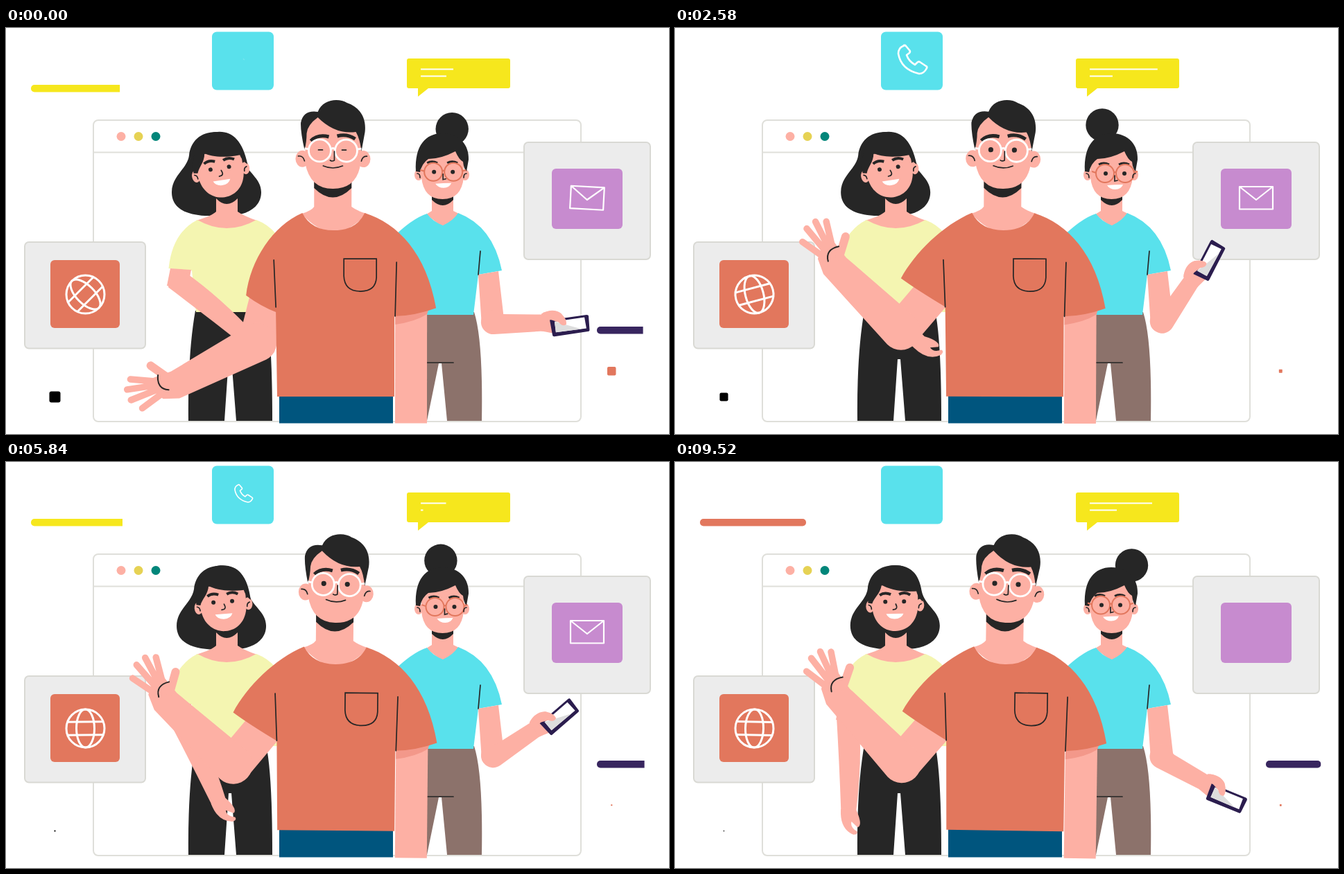
Write an HTML page that moves like this. It is 956 by 586 pixels and loops after 9600 ms.

```html
<!DOCTYPE html>
<html lang="en">
<head>
<meta charset="utf-8">
<title>Team greeting</title>
<style>
html, body { margin: 0; width: 100%; height: 100%; overflow: hidden; background: #fff; }
svg { display: block; width: 100%; height: 100%; }
.skin { fill: #fdb0a4; }
.dark { fill: #262626; }
.coral { fill: #e2775d; }
.cyan { fill: #59e1ec; }
.card { fill: #ececec; stroke: #d9d9d4; stroke-width: 2; }
.frame { fill: none; stroke: #dfdfda; stroke-width: 2; }
.ink { fill: none; stroke: #262626; stroke-width: 1.7; stroke-linecap: round; }
.brow { fill: none; stroke: #262626; stroke-width: 4; }
.white { fill: none; stroke: #fff; stroke-width: 2.6; stroke-linejoin: round; }
.finger { fill: none; stroke: #fdb0a4; stroke-width: 9.5; stroke-linecap: round; }
</style>
</head>
<body>
<svg viewBox="0 0 956 586">
  <defs>
    <clipPath id="leftTrack"><rect x="36" y="82" width="153" height="10.5" rx="5"/></clipPath>
    <clipPath id="rightTrack"><rect x="852" y="431" width="79.5" height="10.5" rx="5"/></clipPath>
  </defs>

  <!-- window, cards and small decorations -->
  <rect class="frame" x="126" y="133" width="703" height="435" rx="7"/>
  <path class="frame" d="M126 179.500H829"/>
  <circle class="skin" cx="166" cy="156.500" r="6.500"/>
  <circle cx="191" cy="156.500" r="6.500" fill="#e6d254"/>
  <circle cx="216" cy="156.500" r="6.500" fill="#02867a"/>
  <rect class="card" x="27" y="309" width="174" height="153.500" rx="6"/>
  <rect class="coral" x="64" y="335" width="100" height="98" rx="6"/>
  <g id="globe" class="white" style="stroke-width:3">
    <circle cx="114.500" cy="384.500" r="27.500"/>
    <ellipse cx="114.500" cy="384.500" rx="13" ry="27.500"/>
    <path d="M89 375H140M89 394H140"/>
  </g>
  <rect class="card" x="747" y="165" width="182" height="169" rx="6"/>
  <rect x="787" y="203" width="102" height="87" rx="6" fill="#c78bcf"/>
  <path id="envelope" class="white" style="stroke-width:2.2" d="M814 229H862V261.500H814ZL838 248L862 229"/>
  <rect class="cyan" x="297" y="5.500" width="89" height="84" rx="7"/>
  <path id="handset" class="white" d="M329 26Q322 29 322 37Q326 60 352 66Q359 66 363 58Q364 56 362 55L353 49Q351 48 349 50L346 53Q337 48 334 39L338 36Q340 34 338 32L333 26Q331 24 329 26Z"/>
  <path fill="#f6e71d" d="M581 44H724Q727 44 727 47V84Q727 87 724 87H609L594 99V87H581Q578 87 578 84V47Q578 44 581 44Z"/>
  <path id="message" class="white" style="stroke-width:2"/>
  <g id="leftBar" clip-path="url(#leftTrack)"></g>
  <g id="rightBar" clip-path="url(#rightTrack)"></g>
  <rect id="blackSquare" x="62.500" y="524.500" width="16" height="16" rx="3"/>
  <rect id="coralSquare" class="coral" x="867" y="489" width="12.500" height="12.500" rx="2"/>

  <!-- woman on the left -->
  <path id="backHair" class="dark" d="M318 149C295 149 281 163 279 183C276 203 254 212 254 236C254 258 272 268 302 270H334C362 270 383 258 383 236C383 215 362 208 357 187C353 160 340 149 318 149Z"/>
  <path class="dark" d="M273 408H375Q384 450 384 567H332L325 478H321L315 567H263Q262 470 273 408Z"/>
  <path class="skin" d="M303 235H334V265Q342 271 362 278Q318 304 274 278Q297 271 303 265Z"/>
  <path class="dark" d="M303 232H334V246Q318 262 303 246Z"/>
  <path fill="#f4f5b1" d="M276 277Q318 301 361 277Q395 290 404 330L400 410H274L268 350L234.500 347Q240 295 276 277Z"/>
  <path class="skin" d="M237 347L267 349L262 376L232 372Z"/>
  <g id="leftForearm" class="skin">
    <path d="M233 360Q247 345 265 362Q266 430 251 503L229 503Q232 430 233 360Z"/>
    <path d="M229 500Q225 528 244 538Q251 539 250 534Q240 527 243 519L251 528Q256 527 255 518Q254 510 250 500Z"/>
  </g>
  <g id="leftFace">
    <ellipse class="skin" cx="282" cy="208" rx="6" ry="9"/>
    <ellipse class="skin" cx="354" cy="207" rx="6" ry="9"/>
    <path class="skin" d="M285 178V210C287 232 302 244 318 244C335 244 349 232 351 210V178Z"/>
    <path class="dark" d="M279 203C281 165 300 149 318 149C342 149 356 165 358 202C352 197 350 191 349 187C325 188 308 183 299 177C297 190 288 195 285 204Z"/>
    <path class="brow" d="M296 192Q303 187 312 191M324 191Q332 187 340 192"/>
    <path class="ink" d="M319 205Q323 213 315 213M280 206q4 1 4 6M356 205q-4 1 -4 6"/>
    <circle class="dark" cx="304" cy="201.500" r="3"/><circle class="dark" cx="331" cy="201.500" r="3"/>
    <path fill="#fff" d="M305 219H330Q327 226.500 317 226.500Q308 226 305 219Z"/>
  </g>

  <!-- woman on the right -->
  <circle id="bun" class="dark" r="23.700"/>
  <path fill="#8c726b" d="M590 410H675Q688 450 686 567H636L628 484H624L607 567H590Z"/>
  <path class="ink" d="M607 483H645"/>
  <path class="skin" d="M614 235H645V264L655 269L630 288L606 269L614 264Z"/>
  <path class="dark" d="M614 236H645V248Q630 264 614 248Z"/>
  <path class="cyan" d="M607 268Q585 275 555 305V414H674L681 356L715 350Q702 286 652 267Q645 278 630 285Q615 279 607 268Z"/>
  <path class="skin" d="M681 356L710 351L718 420A17 17 0 0 1 686 430Z"/>
  <path class="ink" d="M684 322L681 356"/>
  <g id="rightForearm">
    <path class="skin" d="M701 407L716 413L774 413V437L704 442A17 17 0 0 1 701 407Z"/>
    <path class="skin" d="M772 412Q788 403 800 411L808 424L790 440Q778 438 772 437Z"/>
    <path d="M784 421L837 413Q840 413 840 415L841.500 434Q842 437 839 437L791 444.500Q788 445 788 442Z" fill="#2b1d4e"/>
    <path d="M791 423L834 416.500L837 432.500L793 438.500Z" fill="#fff"/>
    <path d="M793 438.500L791 423L830 433.500Z" fill="#ddd"/>
    <path class="skin" d="M774 411Q791 404 801 412Q809 420 808 427Q803 431 797 424L784 420Z"/>
  </g>
  <ellipse class="skin" cx="595" cy="212" rx="6" ry="8"/>
  <ellipse class="skin" cx="662" cy="212" rx="6" ry="8"/>
  <path class="skin" d="M599 185V215Q602 247 629.500 247Q657 247 660 215V180L640 175Z"/>
  <path class="dark" d="M591 207C589 170 605 152 629 152C655 152 668 170 667 190L664 207Q660 203 659 193Q653 190 648 178Q627 189 609 189Q600 195 597 208Z"/>
  <g id="rightFace">
    <path class="brow" style="stroke-width:3" d="M607 195Q614 191 622 195M636 195Q643 191 651 195"/>
    <path fill="none" stroke="#e2775d" stroke-width="2" d="M603 208a13 13 0 1 0 26 0a13 13 0 1 0 -26 0M632 208a13 13 0 1 0 26 0a13 13 0 1 0 -26 0M629 207Q630.500 205 632 207M603 207L597 205M658 207L663 205"/>
    <circle class="dark" cx="617" cy="208" r="3"/><circle class="dark" cx="644" cy="208" r="3"/>
    <path class="ink" d="M630 211V219L634 218"/>
    <path fill="#fff" d="M619 225Q630 224 642 224Q639 231 631 231Q623 231 619 225Z"/>
  </g>
  <path class="ink" d="M593 210q4 0 4 6M664 210q-4 0 -4 6"/>

  <!-- man in the middle -->
  <path fill="#00557e" d="M394 528H558V570.500H394Z"/>
  <g id="man">
    <path class="skin" d="M561 410H607V570.500H561Z"/>
    <path fill="#f3988a" d="M561 414L610 404L607 413Q590 424 561 428Z"/>
    <path id="upperArm" fill="none" stroke="#fdb0a4" stroke-width="54"/>
    <g id="forearm">
      <path class="skin" d="M0 28L130 20L160 24Q170 10 158 -10L137 -20L0 -28A28 28 0 0 0 0 28Z"/>
      <path class="finger" d="M157 18L187 37M160 13L198 26M160 6L200 10M154 -2L191 -8"/>
      <path class="finger" style="stroke-width:12" d="M138 14L152 41"/>
      <path class="ink" style="stroke-width:2" d="M149 24Q160 7 145 -2"/>
    </g>
    <path class="skin" d="M444 210H498V258Q506 264 520 268Q472 320 426 268Q440 264 444 258Z"/>
    <path class="dark" d="M444 215H498V231Q471 258 444 231Z"/>
    <path id="shirt" class="coral"/>
    <path class="ink" d="M386 335L389 403M563 338L561 416M487 333H534V360Q533 380 511 380Q488 380 487 358Z"/>
    <g id="manHead">
      <ellipse class="skin" cx="427" cy="189" rx="10" ry="12"/>
      <ellipse class="skin" cx="515" cy="189" rx="10" ry="12"/>
      <path class="skin" d="M431 140V195Q438 232 471 232Q506 232 511 195L515 140L450 122Z"/>
      <path class="dark" d="M430 176Q424 150 424.500 137Q428 118 449 121C456 102 480 101 491 108C512 115 519 132 517 150L512 178Q510 160 504 150Q474 154 449 129Q434 140 433 152Q433 165 430 176Z"/>
      <path class="brow" style="stroke-width:5" d="M439 163Q449 153 465 157M477 156Q491 152 503 160"/>
      <g id="openEyes" class="dark"><circle cx="453" cy="176" r="3.600"/><circle cx="487" cy="176" r="3.600"/></g>
      <path id="closedEyes" class="ink" d="M450 176H456M484 176H490"/>
      <path class="white" style="stroke-width:2.800" d="M436 177a16 16 0 1 0 32 0a16 16 0 1 0 -32 0M474 177a16 16 0 1 0 32 0a16 16 0 1 0 -32 0M468 175Q471 172 474 175M436 175L430 174M506 175L512 174"/>
      <path class="ink" d="M473 178V191Q470 193 467 191M457 199Q471 205 485 199M421 185Q428 184 430 192M520 185Q514 184 512 192"/>
    </g>
  </g>
</svg>

<script>
const LOOP = 9.6;
const parts = {};
document.querySelectorAll("[id]").forEach(el => parts[el.id] = el);

const mix = (a, b, k) => a + (b - a) * k;
const clamp01 = x => Math.min(1, Math.max(0, x));
const set = (id, name, value) => parts[id].setAttribute(name, value);
const turn = (id, angle, x, y) => set(id, "transform", `rotate(${angle} ${x} ${y})`);
const scaleAt = (id, scale, x, y, angle = 0) =>
  set(id, "transform", `translate(${x} ${y}) rotate(${angle}) scale(${scale}) translate(${-x} ${-y})`);

// Straight interpolation through [time, value] keys.
function track(keys, t) {
  let i = 1;
  while (i < keys.length - 1 && t > keys[i][0]) i++;
  const [t0, a] = keys[i - 1], [t1, b] = keys[i];
  return mix(a, b, clamp01((t - t0) / (t1 - t0)));
}

// The motion is stepped: runs of evenly spaced poses [first, last, count].
const poseTimes = [
  [0, 0, 1], [.2, 1.19, 8], [1.35, 1.75, 4], [1.85, 2.3, 5], [2.47, 3.39, 9],
  [3.58, 4.62, 10], [4.91, 4.91, 1], [5.06, 5.84, 6], [6.1, 6.73, 6], [6.99, 6.99, 1],
  [7.24, 7.96, 5], [8.2, 8.2, 1], [8.35, 9.35, 7], [9.52, 9.52, 1]
].flatMap(([first, last, count]) =>
  Array.from({ length: count }, (_, i) => i ? mix(first, last, i / (count - 1)) : first));

const raiseKeys = [[0, 0], [.25, .15], [.9, 1], [5.8, 1], [6.5, .4], [6.73, .19], [6.97, 0]];
const foldKeys = [[0, 1], [.6, .55], [.93, .53], [1.6, 0], [2, 0], [2.155, .08], [2.455, 1]];
const liftKeys = [[0, .36], [.18, 0], [.34, 0], [.53, .2], [.95, 1], [2.5, 1], [3.1, .36]];
const handsetKeys = [[0, .05], [.12, 0], [.42, 0], [.53, .2], [.95, 1], [2.5, 1], [3.1, .05]];
const mailSizeKeys = [[0, 1], [.2, 0], [.35, 0], [.53, .62], [.8, 1], [3.1, 1]];
const mailTurnKeys = [[0, 3], [.2, 60], [.35, -90], [.53, -37], [.8, 0], [2.9, 0], [3.1, 3]];

const beats = [0, 1.75, 3.39, 4.91, 6.73, 7.96, 9.52];
const onBeats = (...values) => values.map((v, i) => [beats[i], v]);
const globeKeys = onBeats(-45, -18, -11, -10, 9, -8, 1);
const lineOneKeys = onBeats(47, 96, 100, 60, 14, 58, 90);
const lineTwoKeys = onBeats(37, 36, 29, 6, 1, 39, 39);
const blackKeys = onBeats(1, 1, .45, .25, 0, .45, .08);
const coralKeys = onBeats(1, .7, 0, 0, .33, 0, .22);

// Coloured strokes: start of entry, start of exit, left and right colours.
const purple = "#38265f", coral = "#e2775d", blue = "#3b82ef", yellow = "#f6e71d", red = "#d0021b";
const strokes = [
  [-.67, .1, yellow, purple], [.4, 1.23, blue, purple], [2.72, 3.7, coral, purple],
  [4, 5, red, coral], [5.15, 5.95, yellow, purple], [6.4, 7.2, blue, purple],
  [7.75, 99, coral, purple]
];
const bars = [["leftBar", 36, 82, 153, 2], ["rightBar", 852, 431, 79.5, 3]].flatMap(
  ([id, x, y, width, colour]) => strokes.map(stroke => {
    const el = document.createElementNS("http://www.w3.org/2000/svg", "rect");
    el.setAttribute("y", y);
    el.setAttribute("height", 11);
    el.setAttribute("fill", stroke[colour]);
    parts[id].append(el);
    return { el, x, width, enter: stroke[0], leave: stroke[1] };
  }));

function drawMan(t) {
  const phase = t % 6.97;
  const raise = track(raiseKeys, phase);
  const wave = Math.cos(2 * Math.PI * (phase - 4.91) / 1.109);
  const lean = mix(.05, -.22 + 1.53 * wave, raise * raise);
  turn("man", lean, 475, 550);
  turn("manHead", 2.3 * lean, 473, 250);

  const shoulder = mix(14.8, 33, raise) * Math.PI / 180;
  const elbowX = 395 - 128 * Math.sin(shoulder), elbowY = 330 + 128 * Math.cos(shoulder);
  const angle = mix(152.5, 223 + 3.8 * wave, raise);
  set("upperArm", "d", `M384 368L${elbowX} ${elbowY}`);
  set("forearm", "transform", `translate(${elbowX} ${elbowY}) rotate(${angle})`);

  const cuffX = mix(346, 325, raise), cuffY = mix(386, 362, raise);
  set("shirt", "d", `M427 267Q440 292 472 292Q505 292 517 267C565 282 606 325 620 404Q590 415 560 416V532H391
    L389 ${mix(410, 403, raise)}Q${cuffX + 22} ${cuffY + 16} ${cuffX} ${cuffY}
    C${mix(352, 345, raise)} ${mix(335, 325, raise)} 385 285 427 267Z`);

  const blinking = phase < .12;
  set("openEyes", "visibility", blinking ? "hidden" : "visible");
  set("closedEyes", "visibility", blinking ? "visible" : "hidden");
}

function drawWomen(t) {
  const fold = track(foldKeys, t % 2.455);
  set("backHair", "transform", `translate(${-15 * fold} ${fold})`);
  turn("leftFace", -8.8 * fold, 318, 262);
  turn("leftForearm", -54 * fold, 248, 366);

  const lift = track(liftKeys, t % 3.1);
  turn("rightForearm", mix(31, -54, lift), 701, 424);
  set("rightFace", "transform", `translate(${mix(-2, 4, lift)} ${mix(-1.5, 2, lift)})`);
  set("bun", "cx", mix(658.5, 616, lift));
  set("bun", "cy", mix(149, 140, lift));
}

function drawDecorations(t) {
  const cycle = t % 3.1;
  turn("globe", track(globeKeys, t), 114.5, 384.5);
  scaleAt("handset", track(handsetKeys, cycle), 343, 45);
  scaleAt("envelope", track(mailSizeKeys, cycle), 838, 245, track(mailTurnKeys, cycle));
  scaleAt("blackSquare", track(blackKeys, t), 70.5, 532.5);
  scaleAt("coralSquare", track(coralKeys, t), 873.3, 495.3);
  set("message", "d", `M598 59.5h${track(lineOneKeys, t)}M598 69.5h${track(lineTwoKeys, t)}`);
  for (const { el, x, width, enter, leave } of bars) {
    const from = clamp01((t - leave) / .6), to = clamp01((t - enter) / .8);
    el.setAttribute("x", x + width * from);
    el.setAttribute("width", width * Math.max(0, to - from));
  }
}

function render(now) {
  const time = now / 1000 % LOOP;
  const t = poseTimes.findLast(pose => pose <= time + .0005);
  drawMan(t);
  drawWomen(t);
  drawDecorations(t);
}

const start = performance.now();
function tick() {
  render(performance.now() - start);
  requestAnimationFrame(tick);
}
tick();
</script>
</body>
</html>
```
